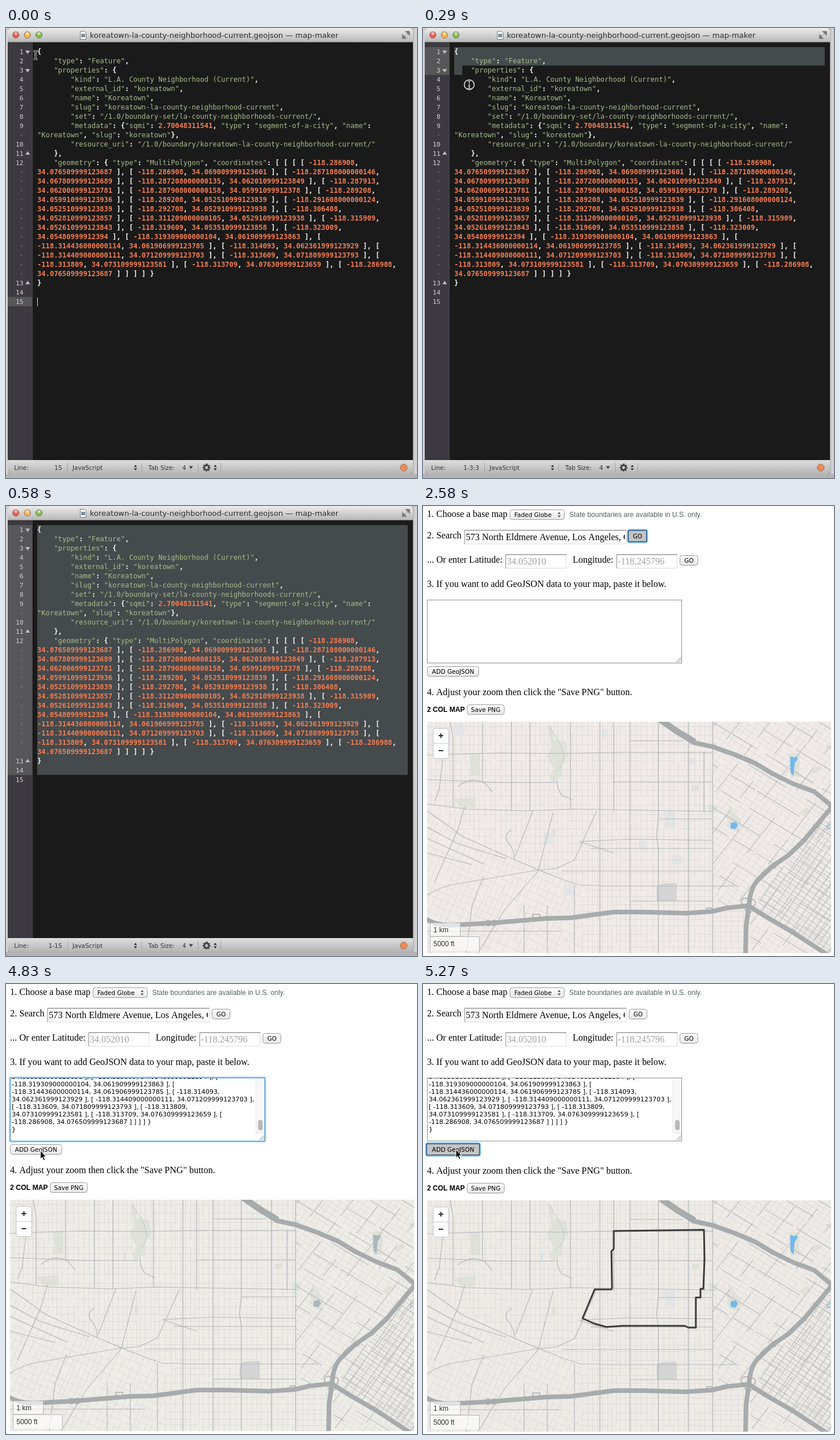
An HTML page with a canvas that plays this animation: 711x778 px, repeating every 7270 ms.

```html
<!DOCTYPE html>
<html lang="en">
<head>
<meta charset="utf-8">
<title>GeoJSON to map</title>
<style>
html, body { margin: 0; width: 100%; height: 100%; overflow: hidden; background: #fff; }
canvas { display: block; }
</style>
</head>
<body>
<canvas id="stage" width="711" height="778"></canvas>
<script>
const ctx = document.getElementById('stage').getContext('2d');
const SANS = '"DejaVu Sans", sans-serif', MONO = '"DejaVu Sans Mono", monospace';
const SERIF = '16px "Liberation Serif", serif', ARIAL = '12px "Liberation Sans", sans-serif';
const UI = '10.4px ' + SANS;
const LOOP = 7270;
const cuts = [0, 140, 290, 430, 580, 2580, 4230, 4530, 4680, 4830, 4980, 5130, 5270];

const source = `{
    "type": "Feature",
    "properties": {
        "kind": "L.A. County Neighborhood (Current)",
        "external_id": "koreatown",
        "name": "Koreatown",
        "slug": "koreatown-la-county-neighborhood-current",
        "set": "/1.0/boundary-set/la-county-neighborhoods-current/",
        "metadata": {"sqmi": 2.70048311541, "type": "segment-of-a-city", "name":
"Koreatown", "slug": "koreatown"},
        "resource_uri": "/1.0/boundary/koreatown-la-county-neighborhood-current/"
    },
    "geometry": { "type": "MultiPolygon", "coordinates": [ [ [ [ -118.286908,
34.076509999123687 ], [ -118.286908, 34.069009999123601 ], [ -118.287108000000146,
34.067809999123689 ], [ -118.287208000000135, 34.062010999123849 ], [ -118.287913,
34.062006999123781 ], [ -118.287908000000158, 34.05991099912378 ], [ -118.289208,
34.059910999123936 ], [ -118.289208, 34.052510999123839 ], [ -118.291608000000124,
34.052510999123839 ], [ -118.292708, 34.052910999123938 ], [ -118.306408,
34.052810999123857 ], [ -118.311209000000105, 34.052910999123938 ], [ -118.315909,
34.052610999123843 ], [ -118.319609, 34.053510999123858 ], [ -118.323009,
34.05480999912394 ], [ -118.319309000000104, 34.061909999123863 ], [
-118.314436000000114, 34.061906999123785 ], [ -118.314093, 34.062361999123929 ], [
-118.314409000000111, 34.071209999123703 ], [ -118.313609, 34.071809999123793 ], [
-118.313809, 34.073109999123581 ], [ -118.313709, 34.076309999123659 ], [ -118.286908,
34.076509999123687 ] ] ] ] }
}`.split('\n');

const pasted = `34.053510999123858 ], [ -118.323009, 34.05480999912394 ], [
-118.319309000000104, 34.061909999123863 ], [
-118.314436000000114, 34.061906999123785 ], [ -118.314093,
34.062361999123929 ], [ -118.314409000000111, 34.071209999123703 ],
[ -118.313609, 34.071809999123793 ], [ -118.313809,
34.073109999123581 ], [ -118.313709, 34.076309999123659 ], [
-118.286908, 34.076509999123687 ] ] ] ] }
}`.split('\n');

function text(str, x, y, font, color = '#000', align = 'left') {
  ctx.font = font;
  ctx.fillStyle = color;
  ctx.textAlign = align;
  ctx.fillText(str, x, y);
}
function rect(x, y, w, h, color) {
  ctx.fillStyle = color;
  ctx.fillRect(x, y, w, h);
}
function fade(y0, y1, top, bottom) {
  const g = ctx.createLinearGradient(0, y0, 0, y1);
  g.addColorStop(0, top);
  g.addColorStop(1, bottom);
  return g;
}
function shape(d, fill, stroke, width = 1) {
  const path = new Path2D(d);
  if (fill) { ctx.fillStyle = fill; ctx.fill(path); }
  if (stroke) { ctx.strokeStyle = stroke; ctx.lineWidth = width; ctx.stroke(path); }
}
function round(x, y, w, h, r, fill, stroke, width = 1) {
  ctx.beginPath();
  ctx.roundRect(x, y, w, h, r);
  if (fill) { ctx.fillStyle = fill; ctx.fill(); }
  if (stroke) { ctx.strokeStyle = stroke; ctx.lineWidth = width; ctx.stroke(); }
}
const disc = (x, y, r, fill, stroke, width) => round(x - r, y - r, 2 * r, 2 * r, r, fill, stroke, width);
const triangle = (x, y, w, h, color) => shape(`M${x - w} ${y - h}h${2 * w}l${-w} ${2 * h}z`, color);
function upDown(x, y, color) {
  triangle(x, y - 3, 2.6, -1.8, color);
  triangle(x, y + 3, 2.6, 1.8, color);
}

// Pointers
function iBeam(x, y, color, halo) {
  const d = `M${x - 3.5} ${y - 7}q3 0 3.5 2q.5-2 3.5-2M${x} ${y - 5}v10M${x - 3.5} ${y + 7}q3 0 3.5-2q.5 2 3.5 2M${x - 2} ${y + 2}h4`;
  if (halo) shape(d, null, halo, 3);
  shape(d, null, color, 1.2);
}
const arrow = (x, y) => shape(`M${x} ${y}v14l3.2-3l2.6 5.6l2.4-1l-2.6-5.5h4.4z`, '#000', '#fff');
function clickRing(x, y, fill) {
  disc(x, y, 9.8, fill, '#111', 1.2);
  disc(x, y, 8.6, null, '#f4f4f4', 1.4);
}

// Editor
function editor(step) {
  const selectedRows = [0, 0, 2, 27, 27][step];
  const gutterTop = step ? 33 : 465;
  const gutterRows = [1, 1, 3, 27, 27][step];
  rect(0, 0, 711, 778, '#d4d4d4');
  rect(703, 0, 8, 778, '#b9b9b9');
  rect(706, 0, 5, 778, '#d0d0d0');
  rect(0, 771, 711, 7, '#b4b4b4');
  round(3, 0, 701, 772, 5, '#1a1a1a');
  round(3, 0, 701, 25, [5, 5, 0, 0], fade(0, 25, '#ececec', '#b6b6b6'));
  rect(3, 24, 701, 1, '#6b6b6b');
  rect(3, 25, 43, 722, '#3c3a40');
  rect(3, gutterTop, 43, gutterRows * 16, '#575658');
  rect(45, 25, 1, 722, '#4b4a4e');
  rect(54, 33, 641, selectedRows * 16, '#454a4c');
  if (step === 2) rect(54, 65, 14, 16, '#454a4c');

  [['#ee5b52', 17], ['#f5b54a', 37], ['#7cc250', 57]].forEach(([color, x]) => {
    disc(x, 12, 5.5, color, '#8a6f60');
    disc(x, 9.5, 2.6, 'rgba(255,255,255,.55)');
  });
  shape('M128.5 5.5h7l3 3v11h-10z', '#fff', '#777');
  rect(130, 10, 7, 6, '#7891a3');
  text('koreatown-la-county-neighborhood-current.geojson — map-maker', 145, 17, '13px ' + SANS, '#2c2c2c');
  shape('M686 18v-6l6 6zM698 6v6l-6-6zM687 17l4-4M697 7l-4 4', '#777', '#777', 1.5);

  let line = 0;
  for (let row = 0; row < 28; row++) {
    const y = 45 + row * 16;
    const wrapped = row === 9 || (row > 12 && row < 25);
    text(wrapped ? '·' : ++line, 30, y, '11px ' + MONO, wrapped ? '#999' : '#d2d2d2', 'right');
    let x = 54;
    for (const token of (source[row] || '').match(/"[^"]*"|-?\d[\d.]*|[^"\d-]+/g) || []) {
      const isString = token[0] === '"', isNumber = /\d/.test(token[token.length - 1]) && !isString;
      text(token, x, y, (isString ? '' : 'bold ') + '12px ' + MONO,
        isString ? '#a9bb8d' : isNumber ? '#f27d52' : '#f4f4f4');
      x += ctx.measureText(token).width;
    }
  }
  for (const row of [0, 2]) triangle(37.5, 42 + row * 16, 4, 3, '#bdbdbd');
  for (const row of [11, 25]) triangle(37.5, 40 + row * 16, 4, -3, '#bdbdbd');
  if (step < 2) rect(54, step ? 34 : 466, 1, 15, '#ddd');

  round(3, 747, 701, 25, [0, 0, 5, 5], fade(747, 772, '#dedede', '#b3b3b3'));
  for (const x of [106, 234, 332, 371]) rect(x, 752, 1, 15, '#a3a3a3');
  text('Line:', 14, 764, UI, '#333');
  text(['15', '1', '1-3:3', '1-15', '1-15'][step], 97, 764, UI, '#333', 'right');
  text('JavaScript', 115, 764, UI, '#333');
  text('Tab Size:', 246, 764, UI, '#333');
  text('4', 305, 764, UI, '#333');
  triangle(320, 760, 3.5, 2.5, '#444');
  upDown(224, 760, '#222');
  upDown(362, 760, '#222');
  disc(347, 760, 4, null, '#444', 3);
  ctx.setLineDash([2, 2.4]);
  disc(347, 760, 6, null, '#444', 2);
  ctx.setLineDash([]);
  disc(688, 760, 6, '#ee8a55', '#a06a50');

  if (step === 0) iBeam(51, 47, '#111', '#ddd');
  if (step > 0 && step < 4) {
    const [x, y] = [[51, 47], [80, 98], [167, 643]][step - 1];
    clickRing(x, y, '#1a1a1a');
    iBeam(x, y, '#ddd');
  }
}

// Map
let seed;
function random() {
  seed = (seed * 16807) % 2147483647;
  return seed / 2147483647;
}
function hatch(area, degrees, gap, color, width, broken = 0) {
  ctx.save();
  ctx.clip(new Path2D(area));
  ctx.translate(501, 573);
  ctx.rotate(degrees * Math.PI / 180);
  ctx.strokeStyle = color;
  ctx.lineWidth = width;
  for (let y = -640; y < 640; y += gap * (0.75 + random() * 0.5)) {
    if (broken) ctx.setLineDash([30 + random() * 90, random() * broken, 15 + random() * 60, random() * broken]);
    ctx.beginPath();
    ctx.moveTo(-640, Math.round(y) + 0.5);
    ctx.lineTo(640, Math.round(y) + 0.5);
    ctx.stroke();
  }
  ctx.restore();
}
const AREA = {
  west: 'M7 373H501V773H272V655L150 608L7 527z',
  southwest: 'M7 527L150 608L272 655V773H7z',
  east: 'M501 373H706V773H570L560 690L501 700z',
  south: 'M501 700L558 692V773H501z',
  downtown: 'M706 522L650 592L592 660L578 695L706 773z'
};
function map(look) {
  const minor = '#dedcd9', major = '#b1b5b7', freeway = '#a8abac';
  const land = ['#f0ebe8', '#eeece7', '#eeebe7'][look];
  const water = look === 1 ? '#aab6bc' : '#73b9e8';
  seed = 4711;
  ctx.save();
  ctx.beginPath();
  ctx.rect(7, 373, 699, 400);
  ctx.clip();
  rect(7, 373, 699, 400, land);
  shape('M82 428h17v38h-17zM215 378l8 8l3 18l22 4l2 25l-10 14l1 20l-18 11l-5-10l8-15l-12-20l8-18zM52 507l39-4v19h-25zM465 483h12v9h-12zM493 517h18l-5 14h-10zM530 517l20 29l-3 19l-18-6l-3-22zM633 428h18v40h-16zM652 530l12-9l6 5l-11 10zM672 457l14-9l5 6l-16 10zM222 559l7-1v13h-6z', '#dfe2d9');
  if (look !== 1) shape('M418 528h18v28h-18z', '#e3e5e6');
  if (look === 0) shape('M52 375h18v22h-18zM310 386h10v16h-10zM209 564h18v20h-18zM431 604h16v16h-16zM373 580h13v14h-13zM243 655h20v18h-20zM458 436h14v12h-14z', '#e4e5e7');

  hatch(AREA.west, 0, 13, minor, 1, 22);
  hatch(AREA.west, 90, 8.5, minor, 1, 18);
  hatch(AREA.southwest, 24, 13, minor, 1, 25);
  hatch(AREA.southwest, -66, 10, minor, 1, 25);
  hatch(AREA.south, 0, 9, minor, 1, 8);
  hatch(AREA.south, 90, 10, minor, 1, 8);
  hatch(AREA.east, 32, 9, minor, 1, 20);
  hatch(AREA.east, -55, 11, minor, 1, 20);
  hatch(AREA.east, 31, 31, major, 1, 60);
  hatch(AREA.east, -52, 36, major, 1, 60);
  hatch(AREA.downtown, 34, 9, '#bfc2c3', 1);
  hatch(AREA.downtown, -56, 11, '#b7babc', 1);

  shape('M405 658q8-5 14-5h19v29h-33z', '#d5d5d5', '#c5c6c6');
  // Avenues, then the older diagonal streets
  shape('M7 431L130 427L240 428L330 426H501M358 406H450M7 473L130 478H232M330 477H501M7 515L75 524L180 527L260 524L501 528M408 541H501M272 580L358 576L501 578M290 592H501M240 631H501M305 657H540M358 683H501M47 373L52 400V520M103 373V478M153 373V527M185 373V527M255 373V525M306 373V773M330 373V530M358 373V773M407 373V540L404 570L407 590V773M459 373V773M486 425V530M501 373V773', null, major, 1.2);
  shape('M7 527L70 572L150 608L200 629L240 645L272 656H305M7 673Q30 658 55 654L195 630L230 627L262 612M7 555L60 584L145 610M7 575L105 619M7 600L85 620M153 560Q136 570 150 585Q160 600 157 612M20 650L60 560L72 520M35 430L28 490L20 510M160 605L190 527M200 628L225 530M262 612L300 528M270 580L330 600M95 773L140 700L200 630M75 773L85 690L105 640M7 735H240M215 690V773M175 690V773M262 655V773M232 474Q232 490 240 500L258 508M60 485Q85 465 108 480L120 495', null, major, 1.1);
  shape('M220 380q5 15 10 20t12 25t-13 35', null, '#bccace');
  if (look) shape('M206 462v16', null, '#a9cfe8');

  ctx.lineJoin = 'round';
  shape('M410 369L440 390L468 409L500 416L540 430L575 445L605 463L640 480L677 494L710 521M710 517L660 577L632 604L604 623L578 648Q566 662 564 690L559 725L558 776M5 714Q25 727 60 724L118 721L215 713L255 712L330 702L380 702L455 704L500 701L525 695L563 691L595 711L640 737L672 758L700 776', null, freeway, 8);
  shape('M411 370L440 390L470 408', null, freeway, 11);
  for (const [x, y, r] of [[113, 721, 5], [123, 721, 5], [558, 685, 7], [569, 686, 6], [564, 696, 7], [607, 622, 4]])
    disc(x, y, r, null, freeway, 1.6);
  shape('M491 704v-9h9v7M190 712v-6h12v5', null, freeway, 1.5);

  shape('M635 433l9 2l3 4l-4 6l-2 22l-5-6z', water);
  shape('M640 436l7-3l1 6z', water);
  shape('M532 548l9-2l4 6l-5 7l-8-2z', water);
  shape('M698 555l6-4M699 560l6-5', null, water, 1.5);

  round(17.5, 384.5, 27, 52, 4, '#fff', '#c0c0c0');
  rect(18, 410, 26, 1, '#ccc');
  rect(27, 396, 8, 2, '#333');
  rect(30, 393, 2, 8, '#333');
  rect(27, 422, 8, 2, '#333');
  const panel = 'rgba(255,255,255,.65)';
  rect(12, 721, 52, 23, panel);
  rect(12, 745, 86, 24, panel);
  shape('M12.5 721v23h52v-23M12.5 769v-24.5h85v24.5', null, '#b5b5b5');
  text('1 km', 18, 737, ARIAL, '#333');
  text('5000 ft', 18, 761, ARIAL, '#333');
  ctx.restore();
}

// Web page
function field(x, y, w, h, value, color) {
  rect(x, y, w, h, '#dcdcdc');
  rect(x, y, w, 2, '#b0b0b0');
  rect(x, y, 2, h, '#c0c0c0');
  rect(x + 2, y + 2, w - 3, h - 3, '#fff');
  ctx.save();
  ctx.beginPath();
  ctx.rect(x, y, w - 3, h);
  ctx.clip();
  text(value, x + 3, y + 18, SERIF, color);
  ctx.restore();
}
function button(label, x, y, w, focused) {
  if (focused) {
    round(x - 1, y - 1, w + 2, 20, 3, null, '#a9d3f3', 5);
    round(x - 1, y - 1, w + 2, 20, 2, null, '#5fa9dd', 3);
    rect(x - 1, y - 1, w + 2, 20, '#24466e');
    rect(x, y, w, 18, '#c4c4c4');
  } else {
    round(x + 0.5, y + 0.5, w - 1, 17, 4, fade(y, y + 18, '#fff', '#e6e6e6'), '#9b9b9b');
  }
  text(label, x + w / 2, y + 13, UI, '#000', 'center');
}
function textarea(filled, focused, caret) {
  if (focused) round(7, 162, 441, 110, 2, null, '#a9d3f3', 4);
  rect(7, 162, 441, 110, focused ? '#3d8fcb' : '#8e8e8e');
  rect(8, 163, 439, 108, '#fff');
  if (filled) {
    ctx.save();
    ctx.beginPath();
    ctx.rect(8, 163, 439, 108);
    ctx.clip();
    pasted.forEach((row, i) => text(row, 10, 163.5 + i * 13, '11px ' + SANS));
    ctx.restore();
    rect(432, 163, 15, 108, '#f8f8f8');
    rect(432, 163, 1, 108, '#e2e2e2');
    round(436, 235, 8, 18, 4, '#b9b9b9');
    rect(432, 257, 15, 14, '#fff');
    rect(432, 257, 15, 1, '#ddd');
  }
  shape('M438.5 270l8-8M442.5 270l4-4', null, '#777');
  if (caret) rect(10, 257, 1, 13, '#000');
}
function page(step) {
  const shift = step >= 10 ? 1 : 0;
  rect(0, 0, 711, 778, '#fff');
  text('1. Choose a base map', 7, 19, SERIF);
  button('', 150, 6, 95);
  text('Faded Globe', 158, 19, UI);
  upDown(235.5, 15, '#555');
  text('State boundaries are available in U.S. only.', 253, 19, ARIAL, '#52625f');
  text('2. Search', 7, 56, SERIF);
  field(71, 41, 281, 25, '573 North Eldmere Avenue, Los Angeles, CA', '#000');
  button('GO', 356, 43, step === 5 ? 30 : 32, step === 5);
  text('... Or enter Latitude:', 7, 98, SERIF);
  field(142, 83, 106, 25, '34.052010', '#a0a0a0');
  text('Longitude:', 259, 98, SERIF);
  field(334, 83, 106, 25, '-118.245796', '#a0a0a0');
  button('GO', 444, 85, 32);
  text('3. If you want to add GeoJSON data to your map, paste it below.', 7, 140, SERIF);
  textarea(step > 5, step > 5 && step < 10, step === 6 || step === 7);
  button('ADD GeoJSON', 7, 277, 90, step >= 10);

  ctx.save();
  ctx.translate(0, shift);
  text('4. Adjust your zoom then click the "Save PNG" button.', 7, 327, SERIF);
  text('2 COL MAP', 7, 356, 'bold ' + ARIAL);
  button('Save PNG', 76, 343, 65);
  map(step === 5 ? 0 : step < 10 ? 1 : 2);
  ctx.restore();

  if (step === 12) {
    ctx.lineJoin = 'round';
    shape('M330 427L486 425L487 475L485 527H480V542H472V594H459L453 591H345L317 593L296 587L276 578L297 528H326L327 525L326 462L330 458z', null, '#3c3c3c', 3);
  }
  if (step === 7) iBeam(344.5, 265.5, '#111');
  if (step === 8) arrow(103.5, 282.5);
  if (step === 9) arrow(59.5, 288.5);
  if (step >= 10) {
    if (step === 10) clickRing(58.5, 286.5, 'rgba(0,0,0,.25)');
    arrow(57, 286.5);
  }
}

let shown = -1;
function draw() {
  const time = performance.now() % LOOP;
  const step = cuts.filter(cut => cut <= time).length - 1;
  if (step !== shown) {
    shown = step;
    (step < 5 ? editor : page)(step);
  }
  requestAnimationFrame(draw);
}
draw();
</script>
</body>
</html>
```
